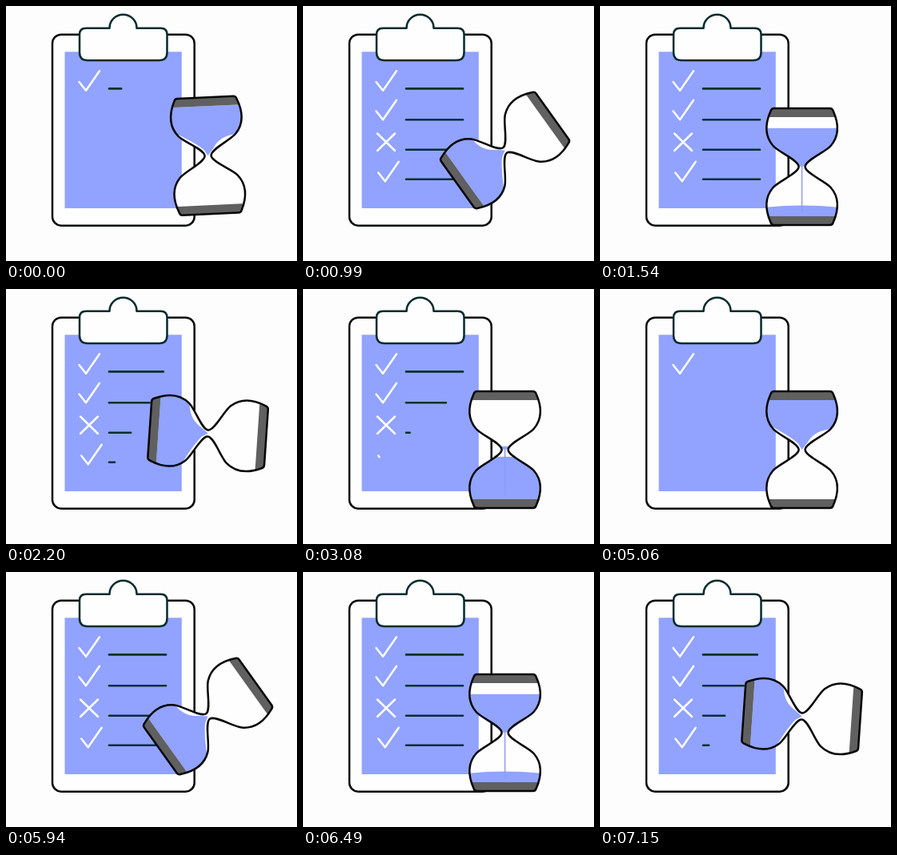
Recreate the animation shown at these times as an HTML page. Size 364 by 319 pixels, loop 7.26 s.

```html
<!DOCTYPE html>
<html lang="en">
<head>
<meta charset="utf-8">
<title>Checklist and hourglass</title>
<style>
  html, body { margin: 0; width: 100%; height: 100%; overflow: hidden; background: #fdfdfd; }
  svg { display: block; width: 364px; height: 319px; }
  path, rect { stroke-linejoin: round; }
</style>
</head>
<body>
<svg viewBox="0 0 364 319" fill="none">
  <defs>
    <path id="half" d=""/>
    <path id="glass" d="M-35-73H35Q38-73 39-70C47-52 46.500-38 36-26C29-18 4-8 4 0C4 8 29 18 36 26C46.500 38 47 52 39 70Q38 73 35 73H-35Q-38 73-39 70C-47 52-46.500 38-36 26C-29 18-4 8-4 0C-4-8-29-18-36-26C-46.500-38-47-52-39-70Q-38-73-35-73Z"/>
    <clipPath id="inside"><use href="#glass"/></clipPath>
  </defs>
  <rect x="58" y="35.700" width="177.700" height="239" rx="11" fill="#fefefe" stroke="#050808" stroke-width="2.5"/>
  <rect x="73.500" y="57.300" width="146.300" height="195.700" fill="#91a3ff"/>
  <path d="M100 27.700H129.500A17 17 0 0 1 163.500 27.700H193.500Q201.500 27.700 201.500 35.700V58Q201.500 68 191.500 68H102Q92 68 92 58V35.700Q92 27.700 100 27.700Z" fill="#fefefe" stroke="#052b2c" stroke-width="2.5"/>
  <g id="list" stroke-linecap="round"></g>
  <g id="timer">
    <use href="#glass" fill="#fefefe"/>
    <g clip-path="url(#inside)">
      <path id="top" fill="#91a3ff"/>
      <rect id="gap" x="-60" y="-62" width="120" fill="#fefefe"/>
      <path id="bottom" fill="#91a3ff"/>
      <path id="stream" d="M0-3V57" stroke="#8f9cf2" stroke-width="1.5"/>
      <path d="M-50-74H50V-62H-50ZM-50 62H50V74H-50Z" fill="#606060"/>
    </g>
    <use href="#glass" stroke="#050505" stroke-width="2.5"/>
  </g>
</svg>
<script>
const LOOP = 7260, STEP = 110, CYCLE = 2475;
const FLIPS = [{ start: 853, length: 480 }, { start: 1943, length: 620 }];
const REST = 30, POUR = 580;

const $ = id => document.getElementById(id);
const clamp = v => Math.max(0, Math.min(1, v));
const smooth = v => { v = clamp(v); return v * v * (3 - 2 * v); };
// Cycle time counted so that it begins at the given moment
const wrap = (p, from) => p < from ? p + CYCLE : p;

const check = (x, y) => `M${x} ${y}l8.500 10.700l17-24.500`;
const marks = [
  check(91.5, 95),
  check(91.5, 131.500),
  "M93 159.500L115 181M115 159.500L93 181",
  check(94.2, 208.500)
];
const rows = [103.4, 142.3, 179.7, 216.7];

function addStroke(d, color, width, drawn, erased) {
  const el = document.createElementNS("http://www.w3.org/2000/svg", "path");
  const attrs = { d, stroke: color, "stroke-width": width, pathLength: 1 };
  for (const name in attrs) el.setAttribute(name, attrs[name]);
  $("list").append(el);
  const progress = (p, span) => smooth((p - span.start) / span.length);
  return p => {
    const v = progress(p, drawn) * (1 - progress(p, erased));
    el.style.display = v < .02 ? "none" : "";
    el.style.strokeDasharray = v > .99 ? "none" : `${v} 2`;
  };
}

// Rows appear from the top down and are erased from the bottom up
const strokes = rows.flatMap((y, i) => {
  const k = rows.length - 1 - i;
  return [
    addStroke(marks[i], "#fefefe", 2.5,
      { start: 230 + 120 * i, length: 110 }, { start: 2205 + 43 * k * k, length: 90 }),
    addStroke(`M129 ${y}H200`, "#06302f", 2.6,
      { start: 280 + 140 * i, length: 290 }, { start: 1814 + 108 * k, length: 480 })
  ];
});

function drawTimer(p) {
  const flip = p < FLIPS[1].start ? FLIPS[0] : FLIPS[1];
  const since = p - flip.start;
  const u = clamp(since / flip.length);
  const angle = -180 * (1 - smooth(1 - (1 - u) ** 1.35));
  const lift = 20.5 * smooth(u / .28) * (1 - smooth((u - .77) / .23));
  $("timer").setAttribute("transform", `translate(252.6 ${201 - lift}) rotate(${angle})`);

  const q = smooth((since - flip.length - REST) / POUR);
  const pouring = q > 0 && q < 1;
  const settle = q > 0 ? 7 : 0;
  $("top").setAttribute("d",
    `M-60-62H60V${settle - 28}C30 ${settle - 25} 18 ${settle - 26} 7 ${settle - 9}` +
    `L0 0L-5 ${settle - 8}Q-20 ${settle - 21} -60 ${settle - 40}Z`);
  $("gap").setAttribute("height", 62 * q);
  const level = 62 - 56 * q;
  $("bottom").setAttribute("d", q > 0 ? `M-60 62V${level + 3}Q0 ${level - 5} 60 ${level + 3}V62Z` : "");
  $("stream").style.display = pouring ? "" : "none";
}

const begin = performance.now();
function frame(now) {
  const t = Math.max(0, now - begin) % LOOP;
  const p = Math.floor(t / STEP) * STEP % CYCLE;
  strokes.forEach(draw => draw(wrap(p, 220)));
  drawTimer(wrap(p, FLIPS[0].start));
  requestAnimationFrame(frame);
}
frame(begin);
</script>
</body>
</html>
```
